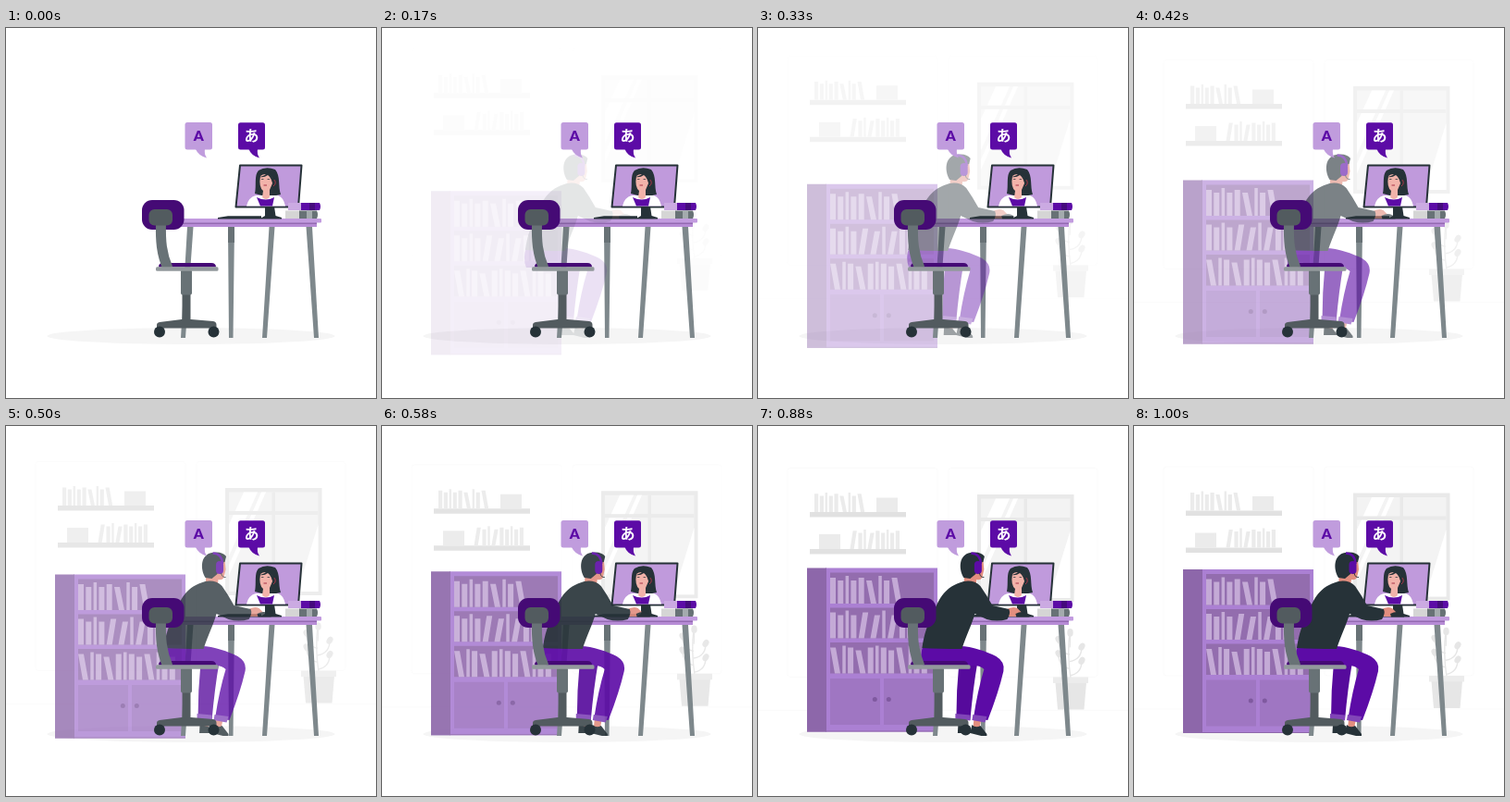
Animation of 400 by 400 pixels, one loop 1.04 s. Source, as an HTML page:

```html
<!DOCTYPE html>
<html lang="en">
<head>
<meta charset="utf-8">
<title>Online language class</title>
<style>
html, body { margin: 0; width: 100%; height: 100%; overflow: hidden; background: #fff; }
svg { display: block; width: 100vw; height: 100vh; }
text { text-anchor: middle; }
</style>
</head>
<body>
<svg viewBox="0 0 400 400">
  <g id="room">
    <g fill="none" stroke="#fafafa" stroke-width=".7">
      <rect x="32" y="44" width="162" height="226" rx="3"/>
      <rect x="206" y="44" width="161" height="226" rx="3"/>
      <path d="M0 306H400"/>
    </g>
    <path fill="#e1e1e1" d="M56 91.5H160V97H56zM56 131.5H160V137H56z"/>
    <g id="shelfBooks" fill="#ebebeb">
      <path d="M128 76H151V91.5H128zM66 115.5H89V131.5H66z"/>
    </g>
    <path fill="#e9e9e9" d="M237 72.5H341.5V188.5H237z"/>
    <path fill="#f3f3f3" d="M241 77H337.5V184.5H241z"/>
    <path fill="#fff" d="M257 77H272L241 146V112zM276 77H281L241 167V156zM337.5 112V184.5H315z"/>
    <path fill="#e9e9e9" d="M287.5 77H291V184H287.5zM241 97.5H337.5V101.5H241z"/>
    <g id="plant" fill="#e6e6e6"></g>
    <path fill="#e6e6e6" d="M321.5 276H355L352.5 305H324z"/>
    <path fill="#ececec" d="M319 270H357V276.5H319z"/>
  </g>

  <ellipse cx="200" cy="333" rx="155.5" ry="9" fill="#f5f5f5"/>

  <g id="bookcase">
    <path fill="#ab80d3" d="M73 155H194V332H73z"/>
    <path fill="#8d67aa" d="M53 155H74V332H53z"/>
    <path fill="#936dae" d="M78 160H190V193.5H78zM78 198H190V231H78zM78 235.5H190V269H78z"/>
    <g id="caseBooks" fill="#c4aad6"></g>
    <path fill="#9f76c2" d="M78 274.5H132V324.5H78zM136 274.5H190V324.5H136z"/>
    <path fill="#8d67aa" d="M53 331H194V332H53z"/>
    <g fill="#7f599f"><circle cx="126.3" cy="297" r="2.5"/><circle cx="141.3" cy="297" r="2.5"/></g>
  </g>

  <g id="desk">
    <path fill="#7e888c" d="M196 215H202.5L194 335H189zM240 215H247L245.5 335H241zM284.5 215H290.5L282 335H277zM324.5 215H331L338 335H333z"/>
    <path fill="#687276" d="M240 215H247V232H240z"/>
    <path fill="#b78cd6" d="M186 210H336V215H186z"/>
    <path fill="#9469b2" d="M186 210H336V212H186z"/>
    <rect x="184" y="206" width="157" height="4.5" rx="1" fill="#c29bdf"/>
    <path fill="#263238" d="M280 193H290L291.5 203L298 205V206.5H274L280 203zM229 205L240 203.3H276V206.5H229z"/>
    <path fill="#c09adc" stroke="#263238" stroke-width="2" stroke-linejoin="round" d="M253 148.5H319.5L316 193.5H248.5z"/>
  </g>

  <g id="teacher">
    <path fill="#263238" d="M269 179C271 170 268 159 273 154Q281 149 291 153C297 160 294 171 297 180Q283 184 269 179z"/>
    <path fill="#fff" d="M260 192.5Q262 183 270 181H294Q300 183 302 192.5z"/>
    <path fill="#5c0ba6" d="M271 183Q281 188 290 183L288 192.5H275z"/>
    <path fill="#f2b3aa" d="M275 160Q280 156 287 160L288 168L285 175V183Q281 187 277 183L278 176Q273 172 275 160z"/>
    <path fill="#263238" d="M274 161Q280 160 283 156Q289 157 288 167Q286 161 283 159Q279 162 274 161z"/>
    <path fill="none" stroke="#263238" stroke-width=".7" d="M276 163.5H278.5M282.5 163.5H285"/>
    <path fill="none" stroke="#a93246" d="M278.5 170H282M290 164Q293 168 289 171"/>
  </g>

  <g id="bookPile">
    <path fill="#cbaae2" d="M305 189H320V197H305z"/>
    <path fill="#5c0ba6" d="M319 189H339Q341 193 339 197H319z"/>
    <path fill="#450a7d" d="M328 189H334V197H328z"/>
    <path fill="#d5d5d5" d="M302 197.5H318V206H302z"/>
    <path fill="#687276" d="M317 197.5H336Q338 202 336 206H317z"/>
    <path fill="#a4abae" d="M325 197.5H331V206H325z"/>
  </g>

  <g id="man">
    <g fill="#e28e7f">
      <path d="M222 158L236 145H242L243 155L241 164Q239 167 235 166L234 173H221z"/>
      <path d="M266 199Q274 194 279 197L285 203Q283 206 277 206H267z"/>
      <path d="M217 317H225L224 327H216zM232 317H240L238 327H231z"/>
    </g>
    <path fill="#263238" d="M221 164C215 154 216 139 228 137Q239 135 243.5 141L242 147L238 148L234 160L228 165z"/>
    <path fill="none" stroke="#5c0ba6" stroke-width="2.4" d="M229 137.5Q239 138 239.5 149"/>
    <rect x="232.5" y="146" width="8" height="14" rx="4" fill="#5c0ba6"/>
    <path fill="none" stroke="#263238" stroke-width=".9" d="M238 159Q239 164 243 163.5"/>
    <path fill="#560a9c" d="M216 255H236Q231 284 228 318L213 316Q213 286 216 255z"/>
    <path fill="#5c0ba6" d="M177 238H217C230 238 246 244 256 249Q266 255 264 265Q259 287 247 318L231.5 316Q236 286 243 263Q239 259 232 259H177Q173 248 177 238z"/>
    <path fill="#8145b8" d="M212 311L228 312.5V318.5L212 316.5zM231 312L246 314L244 320.5L230 318z"/>
    <path fill="#263238" d="M176 240C178 225 182 214 188 202C195 186 200 174 221 168Q232 166 239 173Q246 183 252 194L270 198Q272 203 268 209Q257 212 246 209L233 203C230 214 224 226 219 241Q194 241 176 240z"/>
    <path fill="#263238" d="M277 203Q286 198 292 205V206.5H278z"/>
    <path fill="#263238" d="M215 323L224 325L230 332H214.5zM230 323Q234 327 239 324L246 333V335H240L228 332z"/>
  </g>

  <g id="chair">
    <path fill="#450a75" d="M165 258.5Q165 254 169 254H222Q227 254 227 258.5z"/>
    <rect x="147" y="186" width="45.5" height="32" rx="11" fill="#450a75"/>
    <path fill="none" stroke="#687276" stroke-width="11" d="M167.5 210C167 230 168 244 175 260"/>
    <rect x="154.5" y="196" width="25.5" height="17.5" rx="6" fill="#525b5f"/>
    <path fill="#525b5f" d="M190.5 286H199.5V318H190.5z"/>
    <rect x="189" y="261" width="12" height="27.5" rx="2" fill="#687276"/>
    <rect x="162" y="258.3" width="67.5" height="4.5" rx="1.5" fill="#92999c"/>
    <path fill="#525b5f" d="M163 324.5V321Q163 318.5 166 318L190 315H200L224 317Q227.5 317.5 227.5 321V324.5z"/>
    <g fill="#263238"><circle cx="166" cy="328.5" r="6"/><circle cx="224.5" cy="328.5" r="6"/></g>
  </g>

  <g id="bubbles">
    <g id="bubble" fill="#c09cdd"><rect x="193.5" y="102" width="29.5" height="29.5" rx="2.5"/><path d="M205 131Q208 138 217 140.5Q214 136 215 131z"/></g>
    <g fill="#5c0ba6"><rect x="251" y="102.3" width="29" height="29.2" rx="2.5"/><path d="M262.5 131Q265 138 274 140.5Q271 136 272 131z"/></g>
    <text x="208.2" y="122" fill="#5c0ba6" font-family="Lato, sans-serif" font-size="15.5" font-weight="900">A</text>
    <text x="265.5" y="122" fill="#fff" font-family="'Noto Sans CJK JP', 'Noto Sans CJK', sans-serif" font-size="16" font-weight="700" lang="ja">あ</text>
  </g>
</svg>
<script>
const el = id => document.getElementById(id);
const add = (id, markup) => el(id).insertAdjacentHTML('beforeend', markup);

// One book per sign: | upright, i thin and tall, \ and / leaning.
function addBooks(id, x, base, size, signs) {
  let d = '';
  [...signs].forEach((sign, i) => {
    const thin = sign === 'i';
    const lean = { '\\': -5, '/': 4.5 }[sign] || 0;
    const w = thin ? 3.5 : 6;
    const h = thin ? 30 : 28 - 3 * (i % 2);
    const foot = x + Math.max(0, -lean) * size;
    d += `M${foot} ${base}l${lean * size} ${-h * size}h${w * size}l${-lean * size} ${h * size}z`;
    x += (w + Math.abs(lean) + 2.3) * size;
  });
  add(id, `<path d="${d}"/>`);
}

addBooks('shelfBooks', 61, 91.5, .7, '||i||\\i|\\');
addBooks('shelfBooks', 99.5, 131.5, .7, '/|i/||i||');
addBooks('caseBooks', 78, 193.5, 1, '||i||\\i|\\');
addBooks('caseBooks', 78, 231, 1, '||i|//i/||');
addBooks('caseBooks', 78, 269, 1, '\\i|\\|i||\\i||');

// Leaves alternate left and right down the stem.
add('plant', '<path d="M338 271Q334 245 337 222" fill="none" stroke="#e6e6e6" stroke-width="1.4"/>');
for (let i = 0; i < 5; i++) {
  const side = i ? (-1) ** i : 0;
  const x = 337.5 + 12.5 * side, y = 222 + 7.6 * i;
  add('plant', `<path d="M337 ${y + 16}Q${x} ${y + 14} ${x} ${y}" fill="none" stroke="#e6e6e6" stroke-width="1.4"/>
    <ellipse cx="${x}" cy="${y}" rx="3.2" ry="4.3" transform="rotate(${30 * side} ${x} ${y})"/>`);
}

const cubic = (a, b, s) => 3 * a * s * (1 - s) ** 2 + 3 * b * s * s * (1 - s) + s ** 3;

// cubic-bezier(.36, -.01, .5, 1.38), solved by bisection
function ease(x) {
  let lo = 0, hi = 1;
  for (let i = 0; i < 24; i++) {
    const mid = (lo + hi) / 2;
    if (cubic(.36, .5, mid) < x) lo = mid; else hi = mid;
  }
  return cubic(-.01, 1.38, hi);
}

const LOOP = 1040, FPS = 24, LEAD = .015, SHIFT = 24;
const movers = { room: [0, -1], bookcase: [0, 1], man: [-1, 0] };

function draw(now) {
  const step = Math.floor((now % LOOP + 4) * FPS / 1000);
  const p = step ? ease(Math.min(1, step / FPS + LEAD)) : 0;
  const off = SHIFT * (1 - p);
  for (const [id, [dx, dy]] of Object.entries(movers)) {
    el(id).setAttribute('transform', `translate(${dx * off} ${dy * off})`);
    el(id).setAttribute('opacity', Math.min(1, p));
  }
}

const start = performance.now();
function tick() {
  draw(performance.now() - start);
  requestAnimationFrame(tick);
}
tick();
</script>
</body>
</html>
```
